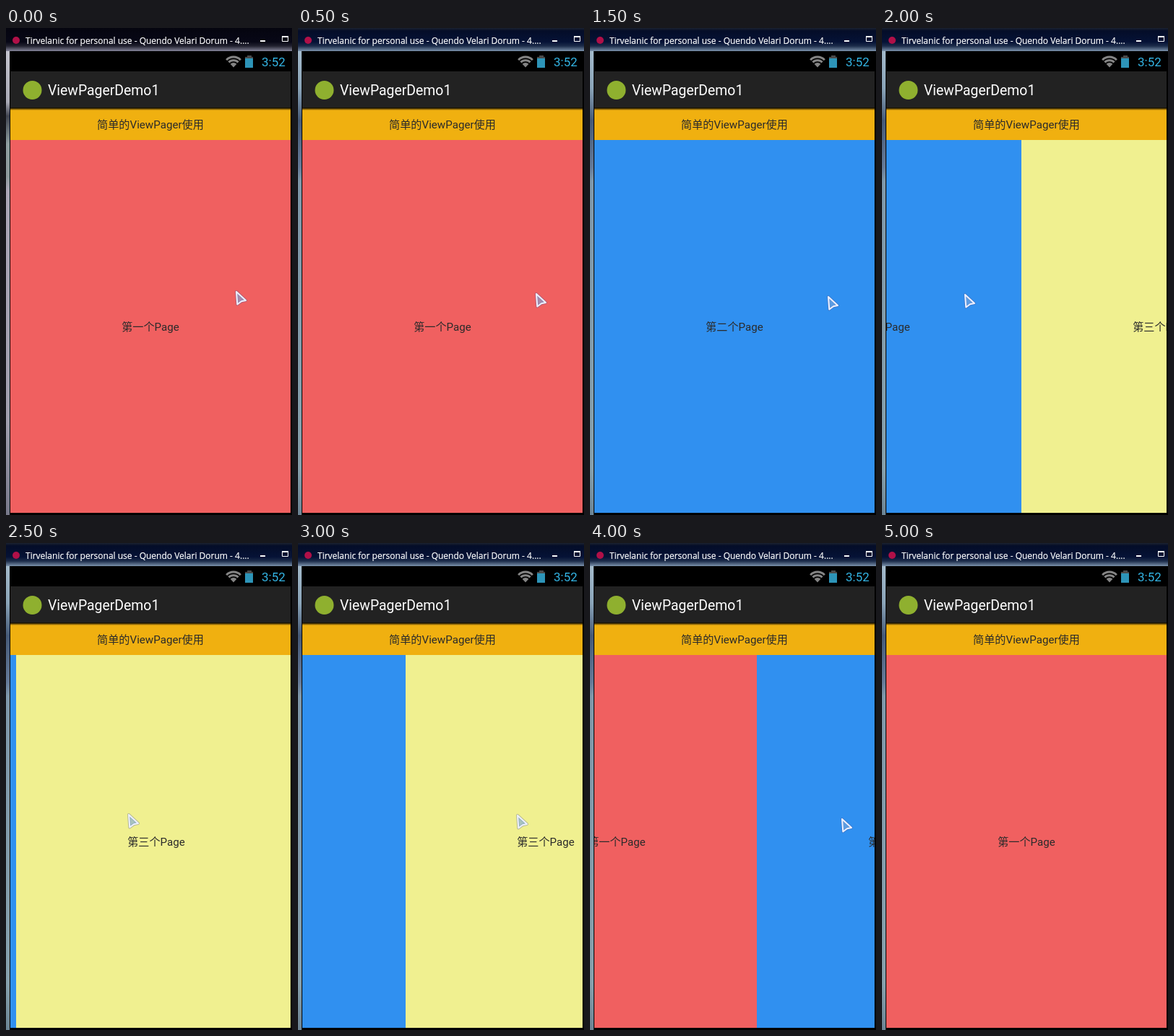
An HTML page that plays this animation: 396x674 px, repeating every 5500 ms.

```html
<!DOCTYPE html>
<html lang="zh-CN">
<head>
<meta charset="utf-8">
<title>ViewPagerDemo1</title>
<style>
  html, body { margin: 0; width: 100%; height: 100%; overflow: hidden; background: #000; }
  svg { display: block; width: 396px; height: 674px; }
  text { font-family: Roboto, "Noto Sans CJK SC", "Noto Sans CJK", sans-serif; white-space: pre; }
  .label { font-size: 15.15px; fill: #2b2b2b; text-anchor: middle; }
  .caption { font-family: "Open Sans", "Noto Sans", sans-serif; font-size: 12px; fill: #fff; stroke: #fff; stroke-width: .2px; }
</style>
</head>
<body>
<svg viewBox="0 0 396 674">
  <defs>
    <linearGradient id="barIdle" x2="0" y2="1">
      <stop offset="0" stop-color="#05050f"/>
      <stop offset=".6" stop-color="#070716"/>
      <stop offset=".78" stop-color="#22222f"/>
      <stop offset="1" stop-color="#85859a"/>
    </linearGradient>
    <linearGradient id="barActive" x2="0" y2="1">
      <stop offset="0" stop-color="#1c2230"/>
      <stop offset=".12" stop-color="#040d28"/>
      <stop offset=".6" stop-color="#051236"/>
      <stop offset=".78" stop-color="#1c2c4a"/>
      <stop offset="1" stop-color="#7c92ac"/>
    </linearGradient>
    <linearGradient id="edgeIdle" x2="0" y2="1">
      <stop offset="0" stop-color="#c4c4ce"/>
      <stop offset=".11" stop-color="#aaaab6"/>
      <stop offset=".14" stop-color="#40434f"/>
      <stop offset=".2" stop-color="#8f9fa0"/>
      <stop offset=".27" stop-color="#8d9a9c"/>
      <stop offset=".3" stop-color="#aaa6b6"/>
      <stop offset=".8" stop-color="#a09fae"/>
      <stop offset="1" stop-color="#77788a"/>
    </linearGradient>
    <linearGradient id="edgeActive" x2="0" y2="1">
      <stop offset="0" stop-color="#a4bacb"/>
      <stop offset=".08" stop-color="#8aa4b8"/>
      <stop offset=".15" stop-color="#465a78"/>
      <stop offset=".25" stop-color="#657a98"/>
      <stop offset=".28" stop-color="#7f98aa"/>
      <stop offset=".9" stop-color="#86a0ac"/>
      <stop offset="1" stop-color="#6c8494"/>
    </linearGradient>
    <linearGradient id="shadow" x2="0" y2="1">
      <stop offset="0" stop-opacity="1"/>
      <stop offset=".35" stop-opacity=".7"/>
      <stop offset="1" stop-opacity="0"/>
    </linearGradient>
    <clipPath id="pagerClip"><rect x="6" y="155" width="388" height="516"/></clipPath>
  </defs>

  <rect id="edge" y="32" width="5" height="642"/>
  <rect id="bar" width="396" height="32"/>
  <circle cx="14" cy="17" r="5" fill="#b01048"/>
  <text class="caption" x="27" y="22">Tirvelanic for personal use - Quendo Velari Dorum - 4....</text>
  <rect x="352" y="17" width="7" height="2" fill="#fff"/>
  <path d="M382.5 12V18.5H390.5V12" fill="none" stroke="#fff"/>
  <path d="M382 12H391" stroke="#fff" stroke-width="2"/>

  <rect x="5" y="32" width="391" height="642"/>
  <g fill="none" stroke="#858585" stroke-width="3">
    <path d="M305.2 44.2A13.8 13.8 0 0 1 324.8 44.2"/>
    <path d="M308.4 47.4A9.3 9.3 0 0 1 321.6 47.4"/>
  </g>
  <path d="M315 54.5L310.6 49.8A6.3 6.3 0 0 1 319.4 49.8Z" fill="#858585"/>
  <path d="M334 38H340V40H342V43H331V40H334Z" fill="#4a4a4a"/>
  <rect x="331" y="42" width="11" height="13" fill="#2d94b8"/>
  <text x="354" y="53" font-size="17" fill="#33b5e5">3:52</text>

  <rect x="6" y="60" width="388" height="50" fill="#222"/>
  <circle cx="36.5" cy="86" r="13" fill="#8fb02f"/>
  <text x="58" y="93" font-size="19.4" fill="#fff">ViewPagerDemo1</text>
  <rect x="6" y="110" width="388" height="45" fill="#f0b010"/>
  <rect x="6" y="110" width="388" height="4" fill="url(#shadow)"/>
  <text class="label" x="200" y="139.3">简单的ViewPager使用</text>

  <g clip-path="url(#pagerClip)"><g id="pages"></g></g>

  <g id="cursor" stroke-linejoin="round">
    <path d="M2 2L15 14L9 15.3L3.3 19.5Z" fill="none" stroke="#505a98" stroke-opacity=".35" stroke-width="4"/>
    <path d="M2 2L15 14L9 15.3L3.3 19.5Z" fill="#7aa6dc" fill-opacity=".6" stroke="#eef1ff" stroke-width="2"/>
  </g>
</svg>
<script>
const STEP = 500;
const PAGE_WIDTH = 388;
const PAGES = [["第一个Page", "#f06060"], ["第二个Page", "#3090f0"], ["第三个Page", "#f0f090"]];

const STEPS = [
  [0, 317, 363], [0, 328, 366], [286, 37, 358], [388, 328, 370],
  [589, 113, 367], [768, 168, 374], [633, 302, 375], [389, 119, 369],
  [163, 347, 380], [5, 356, 384], [0]
];

const byId = id => document.getElementById(id);

function make(tag, attrs, content = "") {
  const node = document.createElementNS("http://www.w3.org/2000/svg", tag);
  for (const key in attrs) node.setAttribute(key, attrs[key]);
  node.textContent = content;
  byId("pages").append(node);
}

PAGES.forEach(([label, fill], i) => {
  const x = 6 + i * PAGE_WIDTH;
  make("rect", { x, y: 155, width: PAGE_WIDTH, height: 516, fill });
  make("text", { x: x + PAGE_WIDTH / 2, y: 419.3, class: "label" }, label);
});

function render(time) {
  const index = Math.floor(time / STEP) % STEPS.length;
  const [scroll, x, y] = STEPS[index];
  const state = index === 0 ? "Idle" : "Active";
  byId("bar").setAttribute("fill", `url(#bar${state})`);
  byId("edge").setAttribute("fill", `url(#edge${state})`);
  byId("pages").setAttribute("transform", `translate(${-scroll} 0)`);
  byId("cursor").setAttribute("visibility", x === undefined ? "hidden" : "visible");
  if (x !== undefined) byId("cursor").setAttribute("transform", `translate(${x} ${y})`);
}

const start = performance.now();
function tick() {
  render(performance.now() - start);
  requestAnimationFrame(tick);
}
tick();
</script>
</body>
</html>
```
